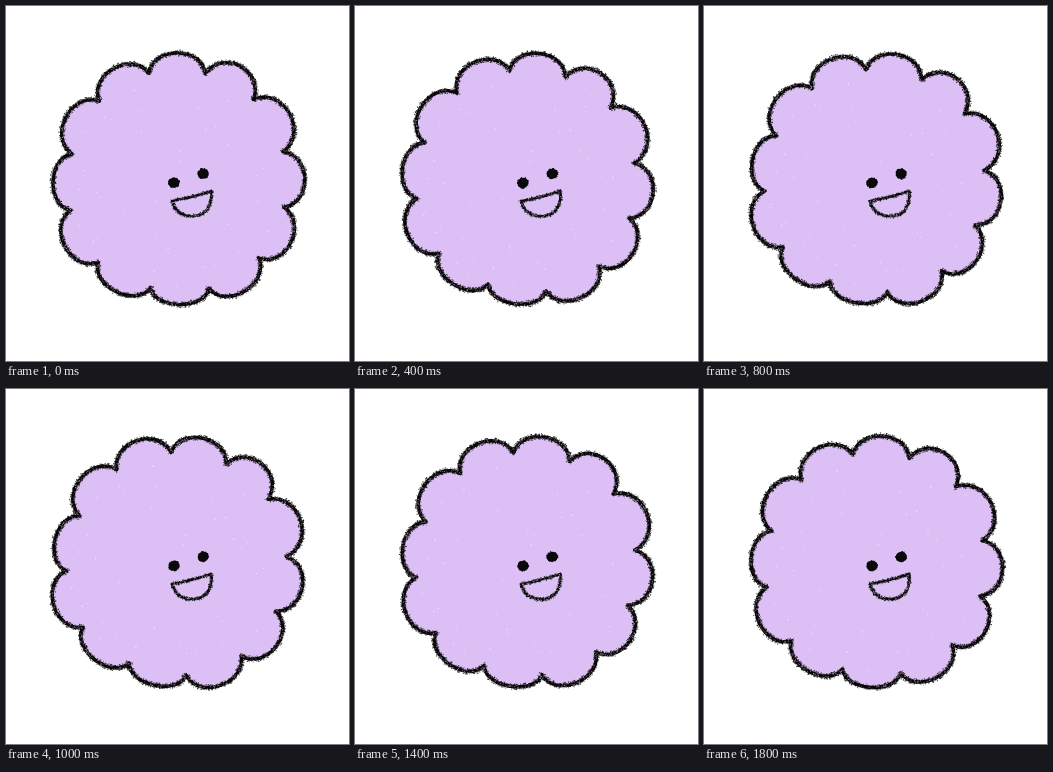
Recreate the animation shown at these times as an HTML page with a canvas. Size 343x355 px, loop 2 s.

```html
<!DOCTYPE html>
<html lang="en">
<head>
<meta charset="utf-8">
<title>Smiling cloud</title>
<style>
html, body { margin: 0; width: 100%; height: 100%; overflow: hidden; background: #fff; }
canvas { display: block; width: 343px; height: 355px; }
</style>
</head>
<body>
<canvas id="stage" width="343" height="355"></canvas>
<script>
const W = 343, H = 355, STEP = 200;
const CX = 172.5, CY = 173;
const LILAC = '#dcbff4', INK = '#0a080a';

// Each lobe: clockwise angle and radius of its first corner, then its bulge
const lobes = [
  [-15.6, 109.8, 20.5], [14.3, 108.8, 23], [43.3, 109.3, 24.5], [75.4, 107.9, 21.5],
  [105, 108.9, 22], [134.6, 112.7, 21], [164.5, 113.4, 16.5], [194.4, 112.2, 18.5],
  [223.9, 115.7, 22], [253.8, 112.2, 18.5], [283.2, 109, 22.5], [314.5, 111.1, 21.5]
];

// Turn in degrees for each pose, played there and back
const turns = [0, 3.2, 6.1, 8.3, 10.1, 11.7];

function random(seed) {
  return () => {
    seed = (seed + 0x6d2b79f5) | 0;
    let t = Math.imul(seed ^ (seed >>> 15), 1 | seed);
    t = (t + Math.imul(t ^ (t >>> 7), 61 | t)) ^ t;
    return ((t ^ (t >>> 14)) >>> 0) / 4294967296;
  };
}

function polar(deg, r) {
  const a = deg * Math.PI / 180;
  return [CX + Math.sin(a) * r, CY - Math.cos(a) * r];
}

function lobeCurve(i, deg) {
  const [angle, r, bulge] = lobes[i];
  const next = lobes[(i + 1) % lobes.length];
  const a = polar(angle + deg, r), b = polar(next[0] + deg, next[1]);
  const dx = b[0] - a[0], dy = b[1] - a[1], len = Math.hypot(dx, dy);
  const ux = dx / len, uy = dy / len, k = bulge / 0.75, lean = 4;
  return [
    a,
    [a[0] + uy * k + ux * lean, a[1] - ux * k + uy * lean],
    [b[0] + uy * k - ux * lean, b[1] - ux * k - uy * lean],
    b
  ];
}

function sample(curve, n) {
  const points = [];
  for (let i = 0; i < n; i++) {
    const t = i / n, u = 1 - t;
    const w = [u * u * u, 3 * u * u * t, 3 * u * t * t, t * t * t];
    points.push([0, 1].map(d => curve.reduce((sum, p, j) => sum + p[d] * w[j], 0)));
  }
  return points;
}

function trace(g, points) {
  g.beginPath();
  points.forEach(p => g.lineTo(p[0], p[1]));
  g.closePath();
}

function dot(g, x, y, r) {
  g.beginPath();
  g.arc(x, y, r, 0, 7);
  g.fill();
}

// Charcoal line: dark core, loose grains, pale flecks
function charcoal(g, points, width, rnd) {
  const scatter = (perPoint, reach, r0, r1) => {
    for (const [x, y] of points) {
      if (rnd() > perPoint) continue;
      const a = rnd() * Math.PI * 2, d = Math.sqrt(rnd()) * reach;
      dot(g, x + Math.cos(a) * d, y + Math.sin(a) * d, r0 + rnd() * (r1 - r0));
    }
  };
  g.lineJoin = 'round';
  g.strokeStyle = g.fillStyle = INK;
  g.lineWidth = width * 0.55;
  trace(g, points);
  g.stroke();
  g.fillStyle = 'rgba(10,8,10,0.75)';
  for (let i = 0; i < 2; i++) scatter(0.9, width * 0.5, 0.35, 0.75);
  g.fillStyle = 'rgba(235,225,242,0.5)';
  scatter(0.55, width * 0.48, 0.3, 0.65);
}

function eye(g, x, y, rnd) {
  g.fillStyle = INK;
  g.beginPath();
  g.ellipse(x, y, 5.5, 5, -0.3, 0, 7);
  g.fill();
  for (let i = 0; i < 36; i++) {
    const a = rnd() * Math.PI * 2, d = 4.3 + rnd();
    dot(g, x + Math.cos(a) * d * 1.06, y + Math.sin(a) * d, 0.4 + rnd() * 0.4);
  }
}

const mouth = [
  [[166, 195], [179, 193], [193, 189], [205.5, 185]],
  [[205.5, 185], [206, 198], [202, 208.5], [189, 210]],
  [[189, 210], [177, 211], [169, 206], [166, 195]]
].flatMap(c => sample(c, 90));

function drawPose(deg, i) {
  const layer = document.createElement('canvas');
  layer.width = W;
  layer.height = H;
  const g = layer.getContext('2d');
  const rnd = random(40 + i), chalk = random(7);
  g.fillStyle = '#fff';
  g.fillRect(0, 0, W, H);

  const rim = lobes.flatMap((_, n) => sample(lobeCurve(n, deg), 200));
  g.fillStyle = LILAC;
  trace(g, rim);
  g.fill();

  // Chalk specks turn with the body
  for (let n = 0; n < 130; n++) {
    const [x, y] = polar(chalk() * 360 + deg, Math.sqrt(chalk()) * 112);
    g.fillStyle = `rgba(255,255,255,${0.15 + chalk() * 0.5})`;
    dot(g, x, y, 0.3 + chalk() * 0.5);
  }

  charcoal(g, rim, 6.4, rnd);
  charcoal(g, mouth, 4.3, rnd);
  eye(g, 168, 176.8, rnd);
  eye(g, 197.2, 167.7, rnd);
  return layer;
}

const poses = turns.map(drawPose);
const stage = document.getElementById('stage').getContext('2d');
const span = (poses.length - 1) * 2;

function show(ms) {
  const beat = Math.floor(ms / STEP) % span;
  stage.drawImage(poses[Math.min(beat, span - beat)], 0, 0);
}

let start;
function tick(now) {
  if (start === undefined) start = now;
  show(Math.max(0, now - start));
  requestAnimationFrame(tick);
}
show(0);
requestAnimationFrame(tick);
</script>
</body>
</html>
```
